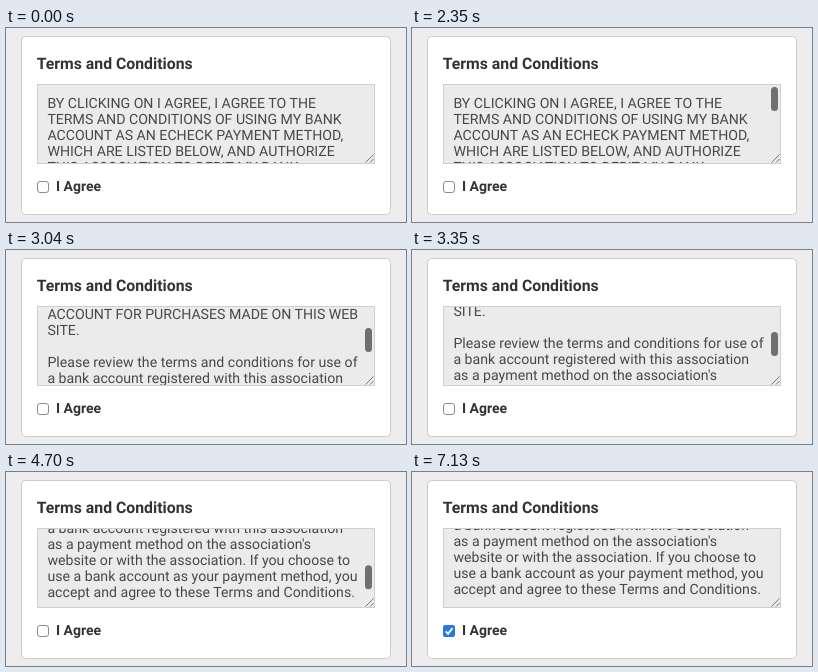
Animation, 400 px wide and 194 px high, one loop 8000 ms. Source, as an HTML page:

```html
<!DOCTYPE html>
<html lang="en">
<head>
<meta charset="utf-8">
<title>Terms and Conditions</title>
<style>
  html, body { margin: 0; width: 100%; height: 100%; overflow: hidden; background: #ededef; }
  svg { display: block; width: 100%; height: 100%; }
  text { font-family: Roboto, Arial, sans-serif; text-rendering: geometricPrecision; }
  .strong { font-weight: 700; fill: #333; }
  #terms text { font-size: 14.15px; fill: #484848; }
</style>
</head>
<body>
<svg viewBox="0 0 400 194">
  <defs><clipPath id="viewport"><rect x="32" y="57" width="336" height="78"/></clipPath></defs>
  <rect width="400" height="194" fill="#ededef"/>
  <rect x="15.5" y="8.5" width="369" height="178" rx="4" fill="#fff" stroke="#cbcbcd"/>
  <text class="strong" x="30.7" y="41" font-size="15.8">Terms and Conditions</text>

  <rect x="31.5" y="56.5" width="337" height="79" fill="#ebebeb" stroke="#cfcfcf"/>
  <g clip-path="url(#viewport)"><g id="terms"></g></g>
  <path d="M359.5 134.5l8-8M364 134.5l3.5-3.5" stroke="#777" fill="none"/>
  <rect id="thumb" x="359" width="7" height="24" rx="3.5" fill="#707070"/>

  <rect x="31.5" y="153.5" width="11" height="11" rx="2.5" fill="#fff" stroke="#8c8c8c"/>
  <g id="check">
    <rect x="31" y="153" width="12" height="12" rx="2.5" fill="#2878e4"/>
    <path d="M33.7 159.3l2.4 2.5 4.3-5.7" fill="none" stroke="#fff" stroke-width="1.8"/>
  </g>
  <text class="strong" x="50" y="163" font-size="14">I Agree</text>
</svg>
<script>
const LOOP = 8000, LINE_HEIGHT = 16;
const lines = [
  'BY CLICKING ON I AGREE, I AGREE TO THE',
  'TERMS AND CONDITIONS OF USING MY BANK',
  'ACCOUNT AS AN ECHECK PAYMENT METHOD,',
  'WHICH ARE LISTED BELOW, AND AUTHORIZE',
  'THIS ASSOCIATION TO DEBIT MY BANK',
  'ACCOUNT FOR PURCHASES MADE ON THIS WEB',
  'SITE.',
  '',
  'Please review the terms and conditions for use of',
  'a bank account registered with this association',
  "as a payment method on the association's",
  'website or with the association. If you choose to',
  'use a bank account as your payment method, you',
  'accept and agree to these Terms and Conditions.'
];
const [terms, thumb, check] = ['terms', 'thumb', 'check'].map(id => document.getElementById(id));

lines.forEach((line, i) => {
  const text = document.createElementNS('http://www.w3.org/2000/svg', 'text');
  text.setAttribute('x', 41.4);
  text.setAttribute('y', 80 + i * LINE_HEIGHT);
  text.textContent = line;
  terms.append(text);
});

const progress = (t, start, end) => Math.min(1, Math.max(0, (t - start) / (end - start)));

// Smoothstep; a bias below 1 brings the fastest part forward.
const swipe = (t, start, end, bias) => {
  const u = progress(t, start, end) ** bias;
  return u * u * (3 - 2 * u);
};

function draw(t) {
  const scroll = Math.round(110 * swipe(t, 2350, 3350, 0.82) + 56 * swipe(t, 3910, 4830, 1.07));
  terms.setAttribute('transform', `translate(0 ${-scroll})`);
  thumb.setAttribute('y', 59 + scroll * 0.21);
  thumb.setAttribute('opacity', t > 2350 ? 1 - progress(t, 5220, 5520) : 0);
  check.setAttribute('opacity', t >= 7130 ? 1 : t >= 7090 ? 0.5 : 0);
}

function tick() {
  draw(performance.now() % LOOP);
  requestAnimationFrame(tick);
}
tick();
</script>
</body>
</html>
```
